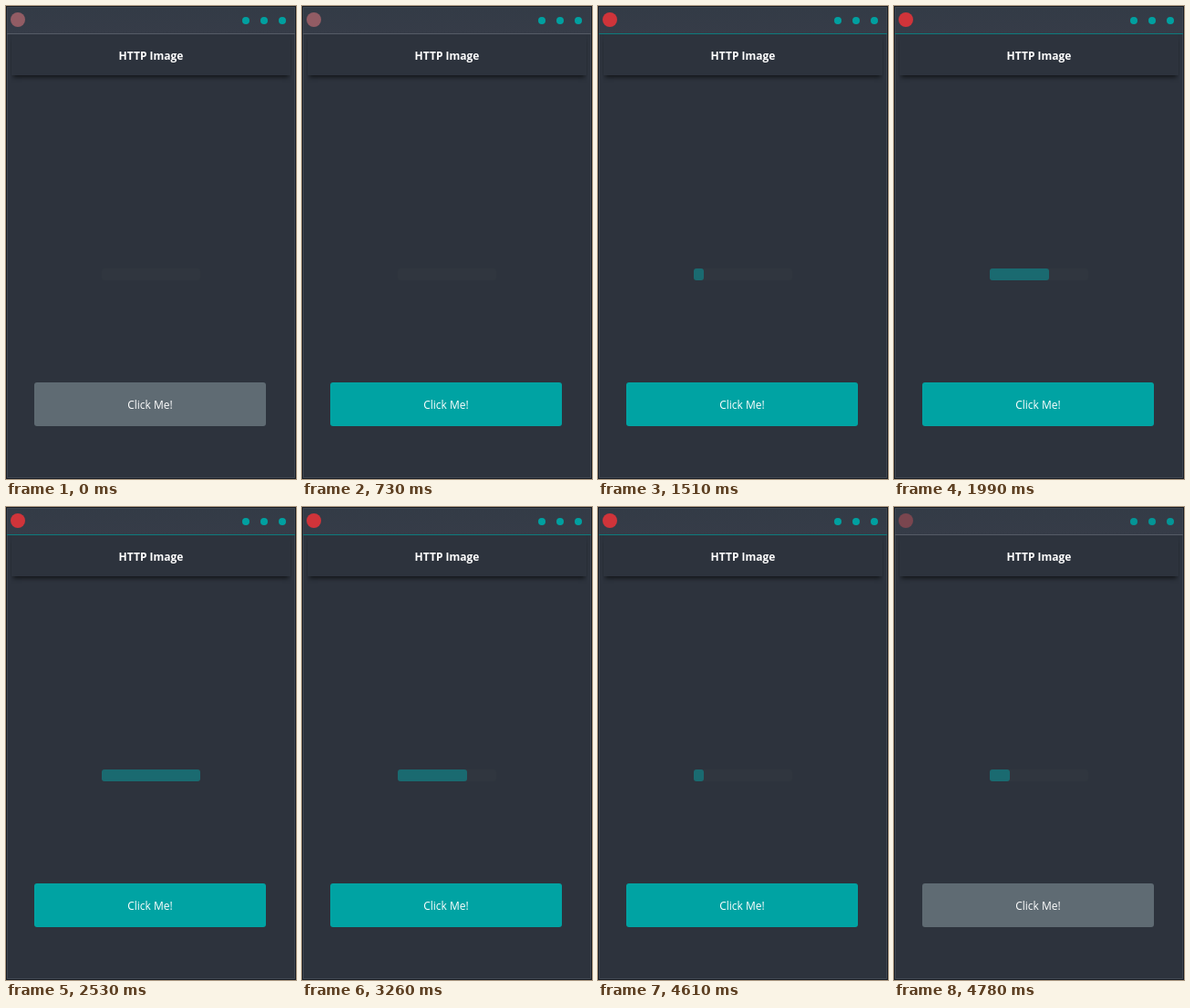
An HTML page that plays this animation: 318 px wide and 519 px high, repeating every 4850 ms.

```html
<!DOCTYPE html>
<html lang="en">
<head>
<meta charset="utf-8">
<title>HTTP Image</title>
<style>
  html, body { margin: 0; width: 100%; height: 100%; overflow: hidden; background: #2d333d; }
  #win { position: relative; width: 318px; height: 519px; overflow: hidden; font: 12px/18px "Open Sans", "Noto Sans", sans-serif; color: #fff; text-align: center; }
  #win * { position: absolute; box-sizing: border-box; }
  #frame { inset: 0; border: 1px solid #171c24; box-shadow: inset 0 0 0 1px #3f4752; }
  #bar { left: 2px; top: 2px; width: 314px; height: 28px; background: linear-gradient(#333b46, #363c48); }
  #line { left: 1px; top: 30px; width: 316px; height: 1px; }
  #icon { left: 5px; top: 7px; width: 16px; height: 16px; border-radius: 50%; }
  .dot { top: 12px; width: 8px; height: 8px; border-radius: 50%; background: #00a0a0; }
  #clip { left: 5px; top: 31px; width: 308px; height: 60px; overflow: hidden; }
  #head { left: 1px; top: 0; width: 306px; height: 45px; background: #2d333d; box-shadow: 0 4px 5px -2px rgba(0, 0, 0, .65); }
  #title { left: 0; top: 46px; width: 318px; font-weight: 700; }
  #track, #fill { left: 105px; top: 288px; height: 13px; border-radius: 3px; }
  #track { width: 108px; background: #30363f; }
  #fill { background: #1a6a70; }
  #button { left: 31px; top: 413px; width: 254px; height: 48px; border-radius: 3px; line-height: 49px; }
</style>
</head>
<body>
<div id="win">
  <div id="clip"><div id="head"></div></div>
  <div id="bar"></div>
  <div id="frame"></div>
  <div id="line"></div>
  <div id="icon"></div>
  <div class="dot" style="left:259px"></div>
  <div class="dot" style="left:279px"></div>
  <div class="dot" style="left:299px"></div>
  <div id="title">HTTP Image</div>
  <div id="track"></div>
  <div id="fill"></div>
  <div id="button">Click Me!</div>
</div>
<script>
  const LOOP = 4850;
  // Each tick adds 10%; after 100% the bar restarts at 10%.
  const ticks = [
    1510, 1580, 1650, 1790, 1890, 1990, 2120, 2200, 2290, 2430,
    2540, 2640, 2780, 2860, 2950, 3090, 3260, 3290, 3430, 3500,
    3570, 3640, 3780, 3890, 4000, 4110, 4240, 4340, 4430, 4520,
    4610, 4780
  ];
  const buttonColors = [[0, "#5f6b73"], [730, "#00a3a3"], [1240, "#0f7f82"], [1510, "#00a3a3"], [4700, "#5f6b73"]];
  const lineColors = [[0, "#555b66"], [1240, "#0d7b7d"], [4780, "#555b66"]];
  const iconColors = [[0, "#925c64"], [1240, "#d0343a"], [4780, "#7a464f"]];
  const dotColors = [[0, "#00a0a0"], [4780, "#049596"]];

  const $ = id => document.getElementById(id);
  const dots = document.querySelectorAll(".dot");
  const at = (steps, t) => steps.filter(s => s[0] <= t).pop()[1];

  function draw(now) {
    const t = now % LOOP;
    const n = ticks.filter(k => k <= t).length;
    $("fill").style.width = (n ? (n - 1) % 10 + 1 : 0) * 10.8 + "px";
    $("button").style.background = at(buttonColors, t);
    $("line").style.background = at(lineColors, t);
    $("icon").style.background = at(iconColors, t);
    dots.forEach(d => d.style.background = at(dotColors, t));
  }

  let start;
  function tick(now) {
    start ??= now;
    draw(now - start);
    requestAnimationFrame(tick);
  }
  draw(0);
  requestAnimationFrame(tick);
</script>
</body>
</html>
```
